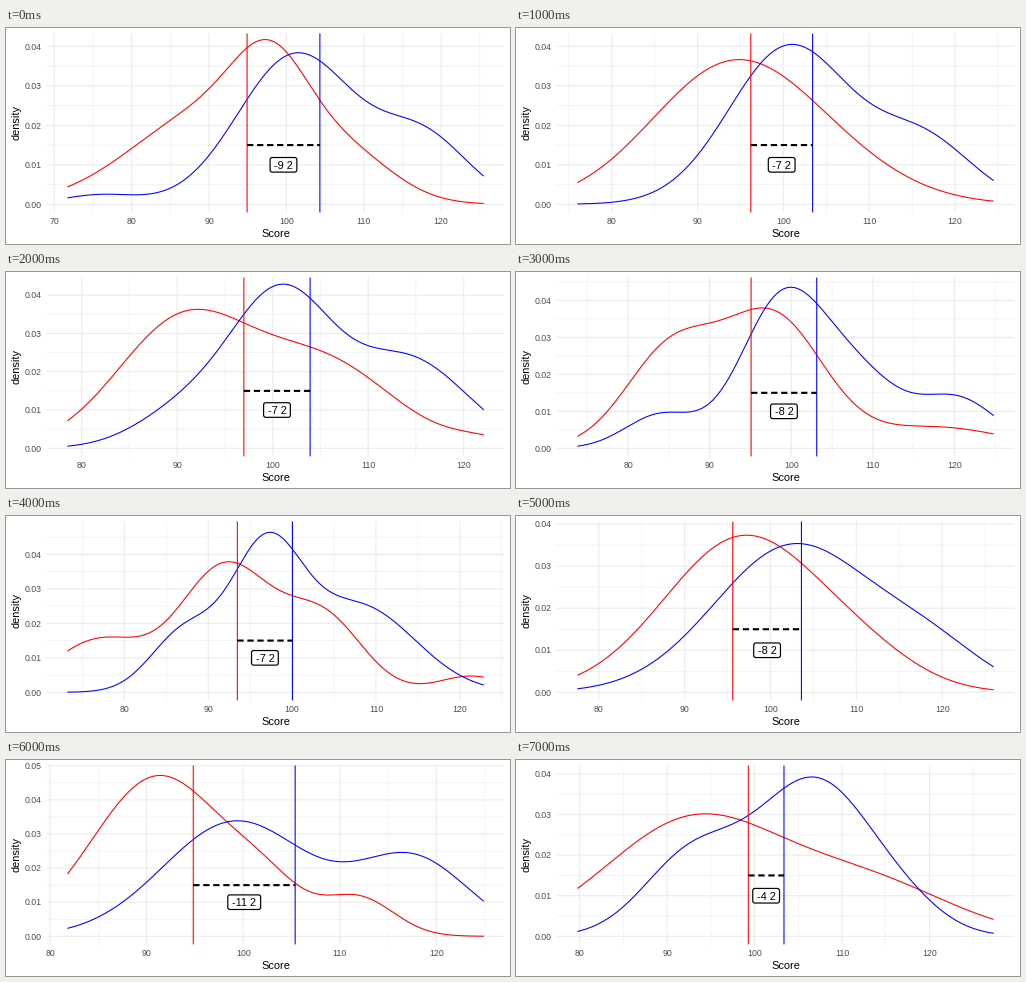
Animation, 504 px wide and 216 px high, one loop 8 s. Source, as a matplotlib script:

```python
import math

import numpy as np
import matplotlib.pyplot as plt
from matplotlib.animation import FuncAnimation
from matplotlib.patches import FancyBboxPatch

plt.rcParams["font.family"] = "Liberation Sans"
plt.rcParams["path.snap"] = False

W, H = 504, 216
LEFT, RIGHT, TOP, BOTTOM = 40.6, 498.5, 5.5, 184.4   # panel, in pixels
X0, X1 = 61.4, 477.7                                 # data range in the panel
Y0, Y1 = 176.3, 13.6                                 # zero and highest density
LINE = 1.07
COLORS = ("red", "blue")


def density(*bumps):
    """Sum of normal bumps (centre, width, height in thousandths).

    Centre and width are in tenths of the score range."""
    t = np.linspace(0, 10, 400)
    return sum(h * np.exp(-((t - c) / w) ** 2 / 2) for c, w, h in bumps)


class Sample:
    """Two groups of scores, each with its mean and density curve."""

    def __init__(self, lo, hi, peak, means, red, blue):
        self.lo, self.hi, self.peak = lo, hi, peak
        self.means = means
        self.curves = (red, blue)

    def x(self, score):
        return X0 + (score - self.lo) * (X1 - X0) / (self.hi - self.lo)

    def y(self, thousandths):
        return Y0 + thousandths * (Y1 - Y0) / self.peak


SAMPLES = [
    Sample(71.7, 125.5, 41.2, (94.92, 104.33),
           density((3.5, 1.9, 24), (4.9, 0.9, 21), (6.8, 1.1, 9.5)),
           density((0.8, 0.9, 2.4), (5.5, 1.4, 38), (8.55, 1.1, 16.5))),
    Sample(76, 124.5, 41.2, (96.2, 103.4),
           density((3.6, 1.9, 33), (6, 1.8, 8)),
           density((5.1, 1.45, 40), (8.3, 1.2, 16))),
    Sample(78.5, 122.1, 42.5, (96.98, 103.92),
           density((2.8, 1.6, 33.2), (6.2, 1.65, 21.5), (10, 0.8, 2)),
           density((2.9, 1.2, 10), (5.15, 1.2, 39), (8.2, 1.4, 23))),
    Sample(73.8, 124.8, 44, (95.08, 103.12),
           density((2.25, 1.1, 26), (4.7, 1.2, 35), (8.6, 1.6, 5.7)),
           density((2, 0.85, 9), (4.9, 1, 38.5), (6.7, 1.05, 18.5),
                   (9.15, 0.95, 13))),
    Sample(73.2, 122.85, 47.2, (93.47, 100.04),
           density((0.75, 1.1, 15), (3.8, 1.1, 36.5), (6.15, 0.95, 21),
                   (9.7, 0.8, 4.7)),
           density((2.8, 0.8, 17), (4.75, 0.85, 39), (7, 1.35, 25))),
    Sample(77.5, 126, 38.7, (95.6, 103.6),
           density((4, 1.9, 37), (7, 1.3, 5)),
           density((5.2, 1.9, 35), (8.5, 1.3, 9))),
    Sample(81.8, 124.9, 47.7, (94.83, 105.38),
           density((2.2, 1.6, 47), (4.8, 0.9, 10), (7, 0.85, 11)),
           density((4.05, 1.75, 33.7), (8.3, 1.35, 22.5))),
    Sample(79.75, 127.35, 40.1, (99.29, 103.37),
           density((2.8, 2.1, 28.6), (7, 2, 12.6)),
           density((2.7, 1.15, 18.5), (5.7, 1.45, 38.5), (8, 0.9, 3))),
]

fig = plt.figure(figsize=(W / 72, H / 72), dpi=72, facecolor="white")
ax = fig.add_axes([0, 0, 1, 1])


def stroke(xs, ys, color, width=LINE, **style):
    ax.plot(xs, ys, color=color, lw=width, solid_capstyle="butt",
            dash_capstyle="butt", **style)


def write(x, y, text, size, color="black", ha="center", **style):
    ax.text(x, y, text, fontsize=size, color=color, ha=ha, va="baseline", **style)


def fives(low, high):
    return range(5 * math.ceil(low / 5), math.floor(high) + 1, 5)


def draw_grid(s):
    unit = (s.hi - s.lo) / (X1 - X0)
    scores = fives(s.lo - (X0 - LEFT) * unit, s.hi + (RIGHT - X1) * unit)
    levels = fives(0, s.peak * (Y0 - TOP) / (Y0 - Y1))
    for major in (False, True):
        width = LINE if major else LINE / 2
        for d in levels:
            if (d % 10 == 0) == major:
                stroke([LEFT, RIGHT], [s.y(d)] * 2, "#ebebeb", width)
        for v in scores:
            if (v % 10 == 0) == major:
                stroke([s.x(v)] * 2, [TOP, BOTTOM], "#ebebeb", width)
    for d in levels[::2]:
        write(36, s.y(d) + 3.2, f"{d / 1000:.2f}", 8.8, "#4d4d4d", "right")
    for v in scores:
        if v % 10 == 0:
            write(s.x(v), 196, str(v), 8.8, "#4d4d4d")
    write(269.5, 209, "Score", 11)
    write(13.6, 95, "density", 11, rotation=90, rotation_mode="anchor")


def draw_label(x, y, text):
    digits = sum(c.isdigit() for c in text)
    w, h = 11 * (0.556 * digits + 0.611) + 7.8, 14.6
    ax.add_patch(FancyBboxPatch(
        (x - w / 2, y - h / 2), w, h, boxstyle="round,pad=0,rounding_size=2.2",
        fc="white", ec="black", lw=1.2, zorder=5))
    write(x, y + 4, text, 11, zorder=6)


def draw(i):
    ax.clear()
    ax.set_xlim(0, W)
    ax.set_ylim(H, 0)
    ax.axis("off")
    s = SAMPLES[i]
    draw_grid(s)
    for curve, color in zip(s.curves, COLORS):
        stroke(np.linspace(X0, X1, len(curve)), s.y(curve), color)
    ends = [s.x(m) for m in s.means]
    for x, color in zip(ends, COLORS):
        stroke([x, x], [TOP, BOTTOM], color)
    stroke(ends, [s.y(15)] * 2, "black", 2.13, dashes=(2.95, 1.75))
    draw_label(sum(ends) / 2, s.y(10), f"{s.means[0] - s.means[1]:.0f} 2")
    return []


anim = FuncAnimation(fig, draw, frames=len(SAMPLES), interval=1000,
                     init_func=lambda: [], repeat=True, repeat_delay=0)
plt.show()
```
